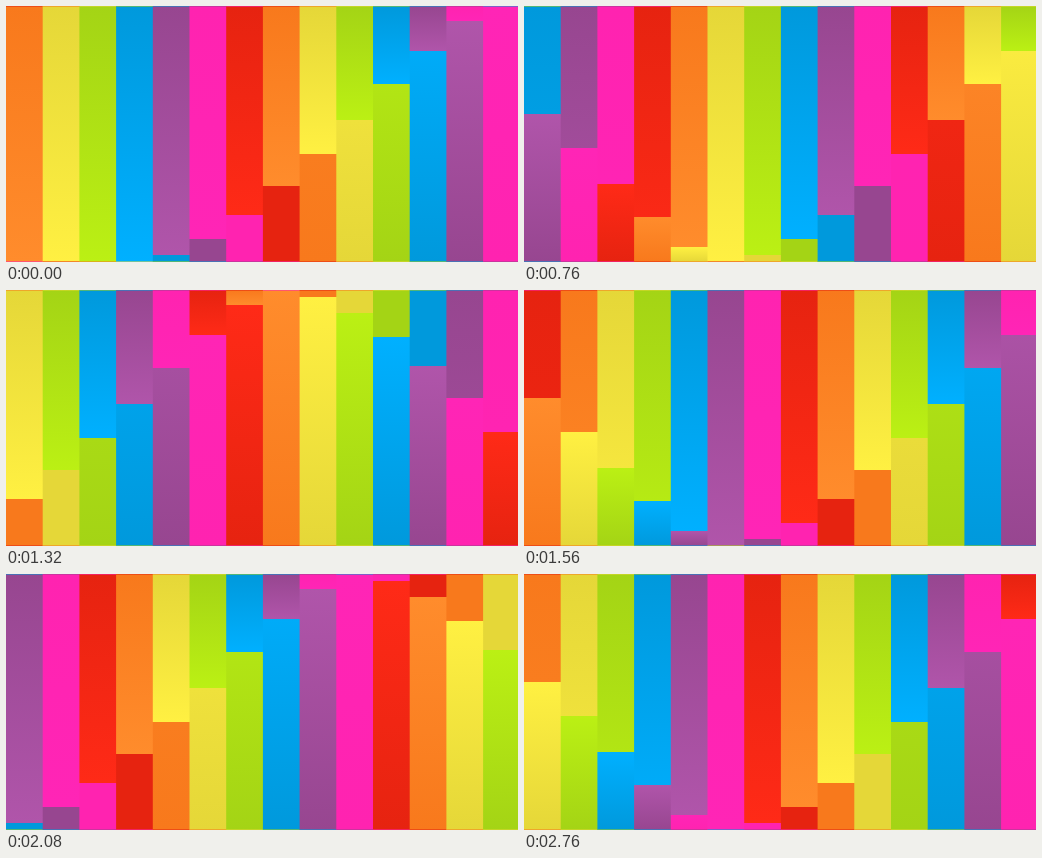
Animation, 512 px wide and 256 px high, one loop 2.8 s. Source, as an HTML page with a canvas:

```html
<!DOCTYPE html>
<html lang="en">
<head>
<meta charset="utf-8">
<title>Rainbow columns</title>
<style>
  html, body { margin: 0; width: 100%; height: 100%; overflow: hidden; }
  canvas { display: block; width: 512px; height: 256px; }
</style>
</head>
<body>
<canvas id="stage" width="512" height="256"></canvas>
<script>
const W = 512, H = 256, COLS = 14, PITCH = 36.7, LOOP = 2800, STEP = 40, TURN = 10;
const ctx = document.getElementById('stage').getContext('2d');

// Rainbow order, each hue as [shaded, lit].
const HUES = [
  ['#e62310', '#ff2a17'],
  ['#f8791c', '#ff8c2c'],
  ['#e5d738', '#fff042'],
  ['#a4d415', '#bbf014'],
  ['#0099dc', '#00b0ff'],
  ['#974690', '#b055aa'],
  ['#ff23b0', '#ff25b6']
];

// Height covered by the incoming face at each tenth of a turn.
const COVER = [0, 7, 23, 47, 76, 108, 142, 178, 211, 241, 256];

const hue = i => HUES[((i % 7) + 7) % 7];
const clamp = v => Math.min(1, Math.max(0, v));

function mix(a, b, k) {
  const part = (s, i) => parseInt(s.slice(i, i + 2), 16);
  const rgb = [1, 3, 5].map(i => Math.round(part(a, i) + (part(b, i) - part(a, i)) * k));
  return `rgb(${rgb})`;
}

// A face is shaded at the stage edge and lit where the two faces meet.
// Behind its outer rim a sliver of the following hue shows.
function face(x, edge, seam, index, glow) {
  const [dark, light] = hue(index);
  if (edge !== seam) {
    const g = ctx.createLinearGradient(0, edge, 0, seam);
    g.addColorStop(0, dark);
    g.addColorStop(1, mix(dark, light, glow));
    ctx.fillStyle = g;
    ctx.fillRect(x, Math.min(edge, seam), W - x, Math.abs(seam - edge));
  }
  ctx.globalAlpha = 0.5;
  ctx.fillStyle = hue(index - 1)[0];
  ctx.fillRect(x, edge ? H - 1 : 0, W - x, 1);
  ctx.globalAlpha = 1;
}

function column(k, step) {
  const age = Math.max(0, 2 * step + k - 3);
  const turn = Math.floor(age / TURN);
  const m = age % TURN;
  const rising = turn % 2 === 0;
  const seam = rising ? H - COVER[m] : COVER[m];
  const from = rising ? 0 : H;
  const x = k * PITCH;

  face(x, from, seam, k + 1 - turn, 1);
  face(x, H - from, seam, k - turn, clamp((m - 4) / 5));
}

function draw(ms) {
  const step = Math.floor(((ms + 0.5) % LOOP) / STEP);
  for (let k = 0; k < COLS; k++) column(k, step);
}

let start;
function tick(now) {
  start ??= now;
  draw(now - start);
  requestAnimationFrame(tick);
}

draw(0);
requestAnimationFrame(tick);
</script>
</body>
</html>
```
